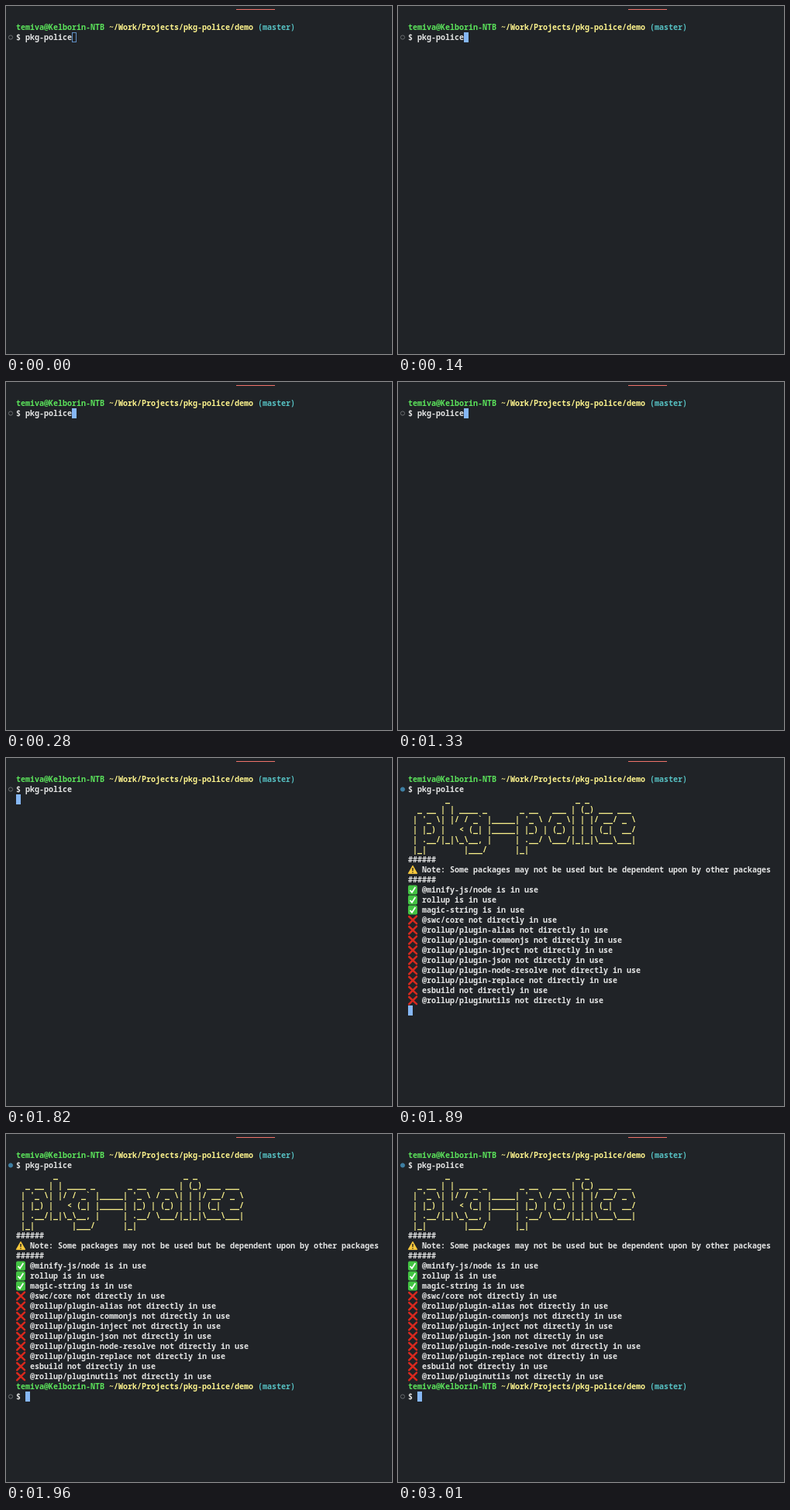
Animation, 498 px wide and 450 px high, one loop 3850 ms. Source, as an HTML page:

```html
<!DOCTYPE html>
<html lang="en">
<head>
<meta charset="utf-8">
<title>Terminal</title>
<style>
  html, body { margin: 0; width: 100%; height: 100%; overflow: hidden; background: #202327; }
  .stage { position: relative; width: 498px; height: 450px; overflow: hidden; }
  .stage > * { position: absolute; }
  .tab { left: 297px; top: 4px; width: 50px; height: 1px; background: #f0736a; }

  pre {
    left: 13px; top: 21px; margin: 0;
    font: 600 10px/13px "Noto Sans Mono", "DejaVu Sans Mono", monospace;
    font-variant-ligatures: none;
    color: #e2e3e3;
  }
  .user, .path { font-weight: 700; }
  .user { color: #5be35b; }
  .path, .banner { color: #fbf28c; }
  .branch { color: #56c0c2; }
  svg { left: 0; top: 0; }

  .cursor {
    left: 13px; top: 21px; width: 6px; height: 13px; box-sizing: border-box;
    border: 1px solid #5f8fc4;
    animation: cursor 3850ms step-end infinite;
  }
  .dot { fill: none; stroke: #686b6e; }
  .run { animation: run 3850ms step-end infinite; }
  .output { animation: output 3850ms step-end infinite; }
  .prompt { animation: prompt 3850ms step-end infinite; }

  /* changes at 70, 1470, 1890 and 1960 ms */
  @keyframes cursor {
    0% { transform: translate(72px, 13px); background: transparent; border-color: #5f8fc4; }
    1.8182% { transform: translate(72px, 13px); background: #86b7f5; border-color: #86b7f5; }
    38.1818% { transform: translate(0, 26px); background: #86b7f5; border-color: #86b7f5; }
    49.0909% { transform: translate(0, 299px); background: #86b7f5; border-color: #86b7f5; }
    50.9091%, 100% { transform: translate(12px, 312px); background: #86b7f5; border-color: #86b7f5; }
  }
  @keyframes run {
    0% { fill: #202327; stroke: #686b6e; }
    49.0909%, 100% { fill: #3e7fa3; stroke: #3e7fa3; }
  }
  @keyframes output {
    0% { visibility: hidden; }
    49.0909%, 100% { visibility: visible; }
  }
  @keyframes prompt {
    0% { visibility: hidden; }
    50.9091%, 100% { visibility: visible; }
  }
</style>
</head>
<body>
<div class="stage">
  <div class="tab"></div>
<pre><span class="user">temiva@Kelborin-NTB</span> <span class="path">~/Work/Projects/pkg-police/demo</span> <span class="branch">(master)</span>
$ pkg-police
<span class="output"><span class="banner">        _                           _ _
  _ __ | | ____ _       _ __   ___ | (_) ___ ___
 | '_ \| |/ / _` |_____| '_ \ / _ \| | |/ __/ _ \
 | |_) |   &lt; (_| |_____| |_) | (_) | | | (_|  __/
 | .__/|_|\_\__, |     | .__/ \___/|_|_|\___\___|
 |_|        |___/      |_|</span>
######
   Note: Some packages may not be used but be dependent upon by other packages
######
   @minify-js/node is in use
   rollup is in use
   magic-string is in use
   @swc/core not directly in use
   @rollup/plugin-alias not directly in use
   @rollup/plugin-commonjs not directly in use
   @rollup/plugin-inject not directly in use
   @rollup/plugin-json not directly in use
   @rollup/plugin-node-resolve not directly in use
   @rollup/plugin-replace not directly in use
   esbuild not directly in use
   @rollup/pluginutils not directly in use</span>
<span class="prompt"><span class="user">temiva@Kelborin-NTB</span> <span class="path">~/Work/Projects/pkg-police/demo</span> <span class="branch">(master)</span>
$ </span></pre>
  <svg width="498" height="450">
    <defs>
      <g id="warn">
        <path d="M6 1.2 11.7 11.3H.3Z" fill="#f8c93d" stroke="#f8c93d" stroke-linejoin="round"/>
        <path d="M6 4v4M6 9.2v1.4" stroke="#26211a" stroke-width="1.4"/>
      </g>
      <g id="pass">
        <rect y=".5" width="12" height="12" rx="2" fill="#43c443"/>
        <path d="M2.6 7 5 9.8 9.4 3" fill="none" stroke="#fff" stroke-width="1.8"/>
      </g>
      <path id="fail" d="M1.2 2 11 11.2M11 1.6 1.2 11.4" stroke="#d9291e" stroke-width="2.5" stroke-linecap="round"/>
    </defs>
    <circle class="dot run" cx="6" cy="40.5" r="2.6"/>
    <circle class="dot prompt" cx="6" cy="339.5" r="2.6"/>
    <g id="icons" class="output"></g>
  </svg>
  <div class="cursor"></div>
</div>
<script>
  const icon = (name, row) => `<use href="#${name}" x="13" y="${21 + 13 * row}"/>`;
  let marks = icon("warn", 9);
  for (let row = 11; row <= 22; row++) marks += icon(row < 14 ? "pass" : "fail", row);
  document.getElementById("icons").innerHTML = marks;
</script>
</body>
</html>
```
